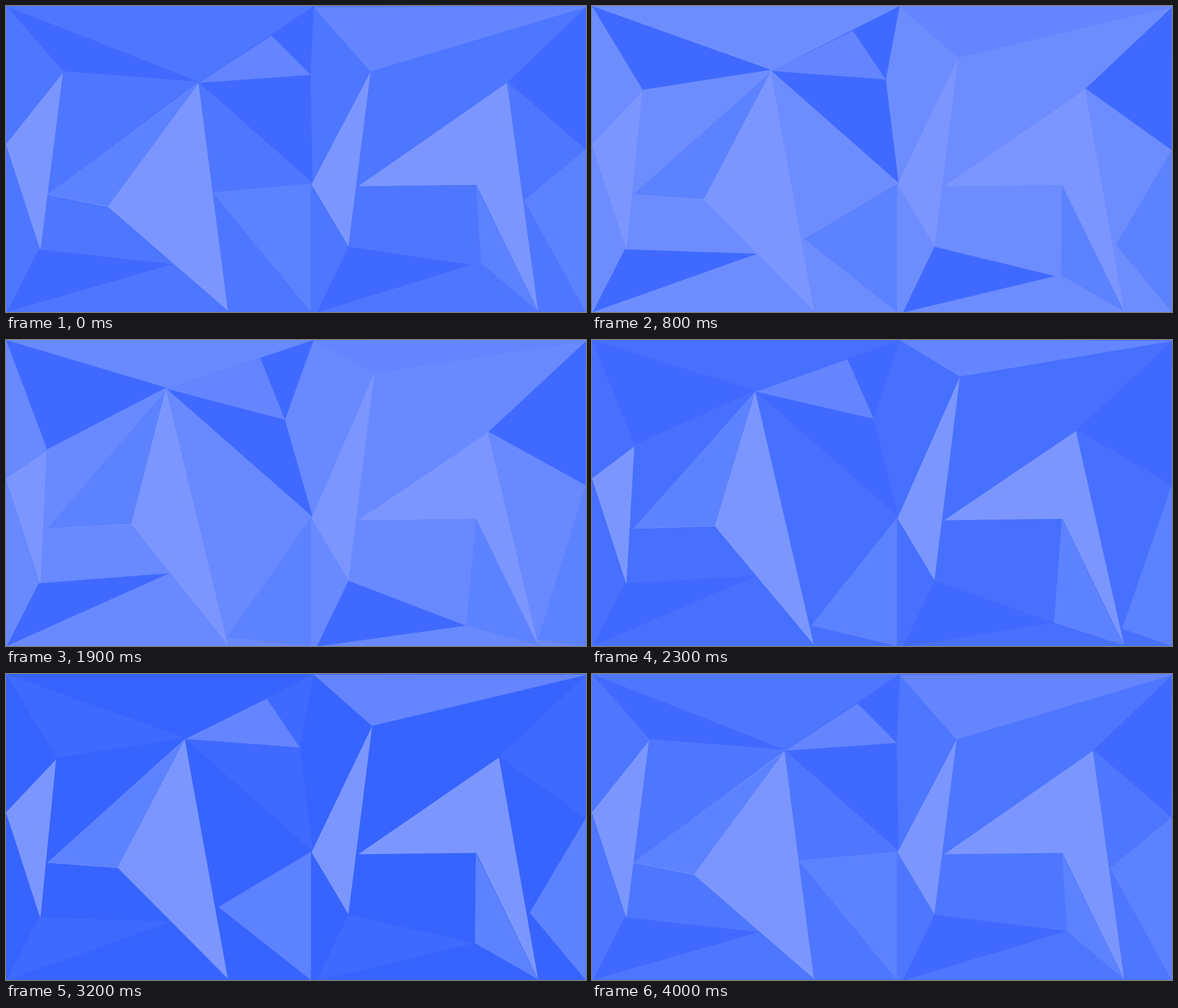
These frames come from a looping animation (1029x544 px, 4.1 s). An HTML page:

```html
<!DOCTYPE html>
<html lang="en">
<head>
<meta charset="utf-8">
<title>Shifting facets</title>
<style>
  html, body { margin: 0; width: 100%; height: 100%; overflow: hidden; background: #4e76ff; }
  svg { display: block; width: 1029px; height: 544px; }
</style>
</head>
<body>
<svg id="stage" viewBox="0 0 1029 544"></svg>
<script>
const stage = document.getElementById('stage');
const W = 1029, H = 544;
const LOOP = 4100, CYCLE = 4000, STEP = 100;
const DARK = '#406aff', MID = '#5d82ff', SOFT = '#6485ff', LIGHT = '#7b97ff';
const facets = [];

// Points are functions of the swing k, which runs from 0 to 1 and back.
const swing = (x, y, dx = 0, dy = 0) => k => [x + dx * k, y + dy * k];
const nudge = (point, dx, dy) => k => {
  const [x, y] = point(k);
  return [x + dx, y + dy];
};
const outOrBack = (a, b) => (k, out) => (out ? a : b)(k);

function facet(fill, ...points) {
  const el = document.createElementNS('http://www.w3.org/2000/svg', 'polygon');
  el.setAttribute('fill', fill);
  stage.appendChild(el);
  facets.push({ el, points });
}

// shared corners, left half
const hub = swing(343, 136.5, -61, -52.5);
const cheek = swing(102, 116, -30.5, 82.5);
const elbow = swing(181, 356, 43.5, -30.5);
const notch = swing(540.5, 122.5, -48, 20.5);
const hand = swing(73.5, 335);
const foot = swing(58, 432.5);
const seam = swing(541, 316);
const crown = swing(546, 0);

// shared corners, right half
const tip = swing(646.5, 116.5, 7, -60.5);
const peak = swing(890, 135, -35.5, 29.5);
const knee = swing(843, 457, -27.5, 53.5);
const toe = swing(826, 460, -10.5, 50.5);
const hip = swing(834, 318);
const heel = swing(944, 542.5);
const shin = swing(607.5, 428);
const edge = swing(W - 0.5, 255, 0, 3.5);
const corner = swing(W, 2);

facet(DARK, swing(0, 0), nudge(hub, -1, -2), cheek);
facet(LIGHT, nudge(cheek, -1, 3), swing(0, 246), nudge(foot, 3, 2));
facet(DARK, foot, swing(1.5, H), swing(296, 459, -7, -46.5));
facet(LIGHT, nudge(hub, -1.5, 0.5), nudge(hand, 0, 0.5), nudge(elbow, 0, 1), swing(393.5, 541.5));
facet(MID, nudge(hub, -2, 2), hand, elbow);
facet(DARK, crown, hub, nudge(seam, 3, -1.5), notch);
facet(SOFT, hub, swing(471, 52.5, -21, -21.5), notch);
facet(MID, swing(366, 331, 27, 208), seam, swing(541, H));

facet(SOFT, swing(546, 2, 0, -2), nudge(corner, 0, -1), corner, tip);
facet(DARK, peak, corner, edge);
facet(LIGHT, nudge(tip, 0.3, 0.5), nudge(seam, 1, 1), nudge(shin, 0, -1));
facet(DARK, shin, swing(551.5, H + 1), outOrBack(toe, knee));
facet(LIGHT, nudge(peak, -1.3, 1.8), swing(625, 320.5), nudge(hip, 0.6, 0), heel);
facet(MID, nudge(hip, -0.4, 0), knee, nudge(heel, -0.6, 0));
facet(MID, swing(919, 345, 25.5, 198), edge, swing(W - 0.5, H));

// The backdrop brightens, falls faster, then rests; its rise spans the loop's end.
function backdrop(t) {
  const s = (t + 600) % CYCLE;
  const glow = s < 2100 ? s / 2100 : Math.max(0, 1 - (s - 2100) / 1000);
  return `rgb(${Math.round(55 + 81 * glow)}, ${Math.round(100 + 62 * glow)}, 255)`;
}

function draw(t) {
  const half = CYCLE / 2;
  const k = 1 - Math.abs(1 - t / half);
  stage.style.background = backdrop(t);
  for (const { el, points } of facets) {
    el.setAttribute('points', points.map(p => p(k, t < half).join()).join(' '));
  }
}

const start = performance.now();
function tick() {
  const t = (performance.now() - start) % LOOP;
  draw(Math.floor(t / STEP) * STEP);
  requestAnimationFrame(tick);
}
tick();
</script>
</body>
</html>
```
